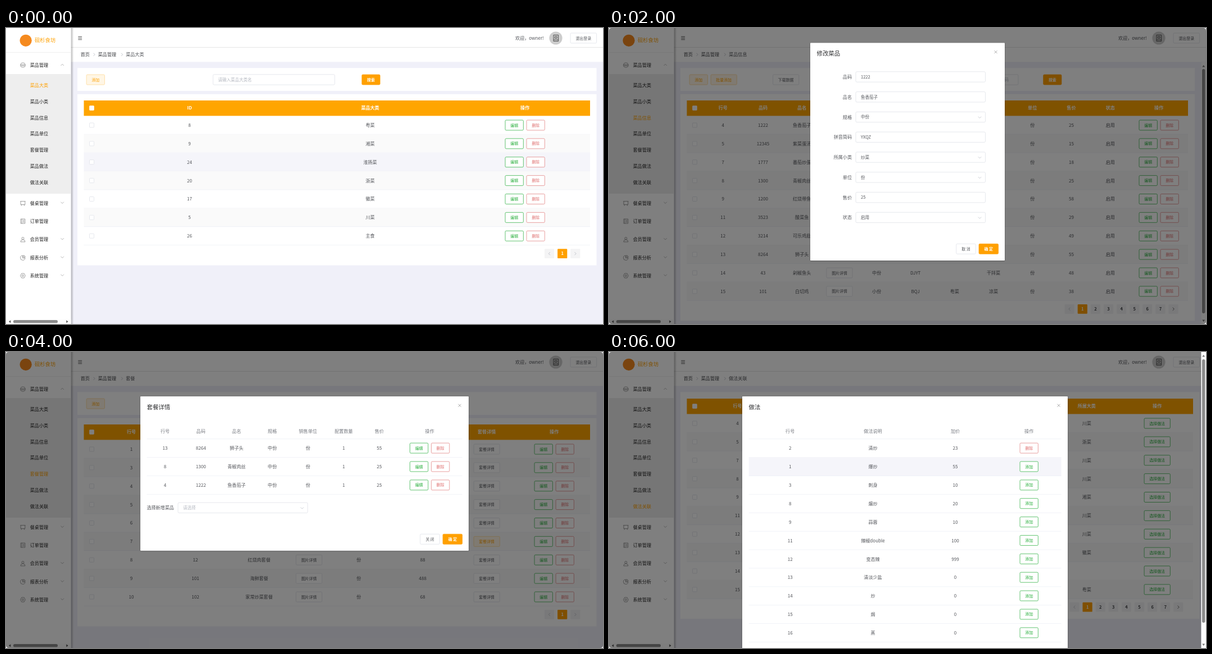
Recreate the animation shown at these times as an HTML page. Size 1062 by 527 pixels, loop 7000 ms.

```html
<!DOCTYPE html>
<html lang="zh-CN">
<head>
<meta charset="utf-8">
<style>
  html, body { margin: 0; width: 100%; height: 100%; overflow: hidden; background: #fff; }
  svg { display: block; width: 100%; height: 100%; }
  text { font-family: "Noto Sans CJK SC", "Noto Sans CJK", "Noto Sans", sans-serif; }
</style>
</head>
<body>
<svg id="stage" viewBox="0 0 1062 527"></svg>
<script>
const ORANGE = '#ffa000', TEXT = '#55575c', BORDER = '#dcdfe6', MUTED = '#b4b8c0';
const ROW = 32.87, CELL = 8.08, SMALL = 6.93;

// Drawing helpers return SVG markup.
const rect = (x, y, w, h, fill, stroke = 'none', r = 0) =>
  `<rect x="${x}" y="${y}" width="${w}" height="${h}" rx="${r}" fill="${fill}" stroke="${stroke}" stroke-width=".7"/>`;
const text = (s, x, y, { size = CELL, fill = TEXT, anchor = 'middle', weight = 400 } = {}) =>
  `<text x="${x}" y="${y + size * .37}" font-size="${size}" fill="${fill}" text-anchor="${anchor}" font-weight="${weight}" xml:space="preserve">${s}</text>`;
const left = (s, x, y, style = {}) => text(s, x, y, { anchor: 'start', ...style });
const path = (d, stroke = '#777', width = .7, fill = 'none') =>
  `<path d="${d}" fill="${fill}" stroke="${stroke}" stroke-width="${width}"/>`;
const hline = (x0, x1, y, color = '#ebeef5') => path(`M${x0} ${y}H${x1}`, color);
const down = (x, y, color = '#aaa') => path(`M${x - 2.7} ${y - 1.3}l2.7 2.7 2.7 -2.7`, color);
const side = (x, y, dir, color) => path(`M${x - dir * 1.3} ${y - 2.6}l${dir * 2.6} 2.6 ${-dir * 2.6} 2.6`, color, .8);
const cross = (x, y) => path(`M${x - 2.5} ${y - 2.5}l5 5m0 -5l-5 5`, '#888');

const BUTTONS = {
  plain: ['#fff', BORDER, TEXT, 400],
  soft: ['#fff6e5', '#ffd48a', ORANGE, 400],
  solid: [ORANGE, ORANGE, '#fff', 600],
  green: ['#fff', '#20ab35', '#20ab35', 500],
  red: ['#fff', '#de7676', '#de6c6c', 400],
};
function button(label, x, y, kind = 'plain', w = label.length > 2 ? 46.2 : 32.3) {
  const [fill, stroke, color, weight] = BUTTONS[kind];
  return rect(x - w / 2, y - 9, w, 18, fill, stroke, 1.7) +
    text(label, x, y, { size: SMALL, fill: color, weight });
}
const editDelete = (x, y) => button('编辑', x - 19, y, 'green') + button('删除', x + 19, y, 'red');

function field(x0, x1, y, value, { select = false, hint = false } = {}) {
  return rect(x0, y - 9.2, x1 - x0, 18.4, '#fff', BORDER, 2) +
    left(value, x0 + 9, y, { size: 7.5, fill: hint ? MUTED : TEXT }) +
    (select ? down(x1 - 10, y + .5, '#b4b8c0') : '');
}
const hintField = (x0, x1, label, select) => field(x0, x1, 92, label, { select, hint: true });

// A cell starting with # is drawn as a button, with ! as a highlighted one.
function cell(value, x, y) {
  if (value[0] === '#') return button(value.slice(1), x, y);
  if (value[0] === '!') return button(value.slice(1), x, y, 'soft');
  return text(value, x, y);
}
const parse = rows => rows.split('|').map(row => row.split(','));

function table({ x0 = 138.5, x1 = 1039, y = 129, heads, xs, rows, opX, hover = -1, hoverFill = '#f5f5fa', op = editDelete }) {
  const box = (cy, stroke) => rect(x0 + 10, cy - 4, 8, 8, '#fff', stroke, 1);
  const headStyle = { fill: '#fff', weight: 700 };
  let out = rect(x0, y, x1 - x0, 27.4, '#ffa500') + box(y + 13.5, '#fff');
  heads.split(',').forEach((h, i) => out += text(h, xs[i], y + 13.5, headStyle));
  out += text('操作', opX, y + 13.5, headStyle);
  parse(rows).forEach((row, i) => {
    const top = y + 27.4 + i * ROW, cy = top + 16.6;
    if (i === hover || i % 2) out += rect(x0, top, x1 - x0, ROW, i === hover ? hoverFill : '#fafafa');
    out += hline(x0, x1, top + ROW) + box(cy, BORDER) + op(opX, cy);
    row.forEach((value, k) => out += cell(value, xs[k], cy));
  });
  return out;
}

function pager(pages, y, right = 1012.8) {
  let out = '';
  for (let i = 0; i <= pages + 1; i++) {
    const x = right - (pages + 1 - i) * 23.1, active = i === 1;
    out += rect(x - 8.6, y - 8.4, 17.2, 16.8, active ? ORANGE : '#f4f4f5', 'none', 1.2);
    if (i === 0) out += side(x, y, -1, MUTED);
    else if (i > pages) out += side(x, y, 1, pages > 1 ? '#444' : MUTED);
    else out += text(i, x, y, { size: 7.5, weight: 700, fill: active ? '#fff' : '#404246' });
  }
  return out;
}

const card = (y0, y1, x0 = 127, x1 = 1050.5) => rect(x0, y0, x1 - x0, y1 - y0, '#fff');
const cards = (bottom, x0, x1) => card(71.2, 112, x0, x1) + card(117.8, bottom, x0, x1);
const add = button('添加', 159.3, 92, 'soft');
const search = x => button('搜索', x, 92, 'solid');

function scrollbar(top, bottom, thumbTop, thumbBottom) {
  return rect(1053.6, top, 8.4, bottom - top, '#fcfcfc') +
    rect(1055, thumbTop, 5.4, thumbBottom - thumbTop, '#8b8b8b', 'none', 2.7) +
    path(`M1055.2 ${top + 8.5}h5l-2.5 -3.4zM1055.2 ${bottom - 7.5}h5l-2.5 3.4z`, 'none', 0, '#777');
}

const MENU = ['菜品大类', '菜品小类', '菜品信息', '菜品单位', '套餐管理', '菜品做法', '做法关联'];
const SECTIONS = [['菜品管理', 66], ['餐桌管理', 312], ['订单管理', 344], ['会员管理', 376.5], ['报表分析', 409], ['系统管理', 441]];
const ICONS = [
  'M-4.5 -.5h9q0 4 -3 4.5h-3q-3 -.5 -3 -4.5zM-4 -1q0 -3 4 -3t4 3M-3.5 1.3h7',
  'M-4.5 -3.5h9M-3.8 -3.5v6h7.6v-6M-2 2.5l-1 2M2 2.5l1 2',
  'M-3.8 -4h7.6v8h-7.6zM-1.8 -4v8M0 -1.8h2.5M0 0h2.5M0 1.8h2.5',
  'M-2 -2a2 2 0 1 0 4 0a2 2 0 1 0 -4 0M-4 4.3q0 -4 4 -4t4 4z',
  'M-.5 -4a4.2 4.2 0 1 0 4.5 4.5h-4.5zM1 -4.3a4 4 0 0 1 3.3 3.3h-3.3z',
  'M-2.2 -4h4.4l2.2 4l-2.2 4h-4.4l-2.2 -4zM-1.6 0a1.6 1.6 0 1 0 3.2 0a1.6 1.6 0 1 0 -3.2 0',
];

function sidebar(active) {
  let out = rect(115.5, 0, 5, 527, 'url(#shade)') + rect(0, 0, 115.5, 527, '#fff') +
    '<circle cx="35.2" cy="22.3" r="10.6" fill="#f58a1f"/>' +
    left('砚杉食坊', 51, 22, { size: 9.3, fill: ORANGE }) + hline(0, 115.5, 43.5, '#e8e8e8') +
    rect(0, 82, 115.5, 213, '#eeeeee');
  SECTIONS.forEach(([label, y], i) => {
    out += left(label, 42.8, y, { fill: '#222', weight: 500 }) +
      `<g transform="translate(30 ${y})">${path(ICONS[i])}</g>`;
    if (i === 0) out += path(`M97.5 ${y + 1}l2.7 -2.7 2.7 2.7`, '#999');
    else if (i !== 2) out += down(100.2, y - 1, '#999');
  });
  MENU.forEach((label, i) => out += left(label, 42.8, 102 + i * 28.83, { fill: i === active ? ORANGE : '#222' }));
  return out + rect(0, 518.5, 115.5, 8.5, '#fcfcfc') + rect(13, 520, 79, 5.3, '#8b8b8b', 'none', 2.6) +
    path('M8.3 520.2v5l-3.3 -2.5zM107.3 520.2v5l3.3 -2.5z', 'none', 0, '#555');
}

function page(active, body, crumb = MENU[active]) {
  return rect(0, 0, 1062, 527, '#f0f0f9') + rect(115, 0, 947, 60.3, '#fff') + hline(115, 1062, 34.5, '#dcdcdc') +
    path('M128.3 15.3h6.8m-6.8 2.7h6.8m-6.8 2.7h6.8', '#444', .9) +
    left('欢迎，owner!', 906, 18) + '<circle cx="978" cy="18" r="11.6" fill="#cdcdcd"/>' +
    path('M974 12.5h8.5v11h-8.5zM974 21h8.5M976.5 15h3.5v3.3h-3.5z', '#444', .9) +
    button('退出登录', 1027.3, 18, 'plain', 46.5) +
    left('首页', 132.8, 47.5, { fill: '#404246' }) + left('菜品管理', 163.8, 47.5, { fill: '#404246' }) +
    left(crumb, 213.2, 47.5) + side(156.8, 47.3, 1, MUTED) + side(206.3, 47.3, 1, MUTED) +
    body + sidebar(active);
}

const dim = (width = 1062) => rect(0, 0, width, 527, 'rgba(0,0,0,.5)');
function dialog(x0, x1, y0, y1, title, body) {
  return `<g filter="url(#drop)">${rect(x0, y0, x1 - x0, y1 - y0, '#fff', 'none', 1)}</g>` +
    left(title, x0 + 11.5, y0 + 19, { size: 10.4, fill: '#303133' }) + cross(x1 - 16, y0 + 16.2) + body;
}
const footer = (cancel, right, y) =>
  button(cancel, right - 57.7, y, 'plain', 34.6) + button('确 定', right - 17.4, y, 'solid', 34.6);

// Form rows are "label,value"; a value starting with > is a drop-down.
function form(y0, rows) {
  return parse(rows).map(([label, value], i) => {
    const y = y0 + i * 35.77, select = value[0] === '>';
    return text(label, 432, y, { anchor: 'end' }) +
      field(439, 669.5, y, select ? value.slice(1) : value, { select });
  }).join('');
}

function dialogTable({ x0, x1, heads, xs, rows, op, hover = -1 }) {
  let out = hline(x0, x1, 154.7);
  heads.split(',').forEach((h, i) => out += text(h, xs[i], 141.3, { fill: '#777a80' }));
  parse(rows).forEach((row, i) => {
    const y = 171.4 + i * ROW;
    if (i === hover) out += rect(x0, y - 16.5, x1 - x0, ROW, '#f5f5fa');
    out += hline(x0, x1, y + 16.3) + op(xs.at(-1), y - .3, i);
    row.forEach((value, k) => out += text(value, xs[k], y));
  });
  return out;
}

function methodTabs() {
  const labels = '全部,焗,炒,口味要求,民俗要求,海鲜做法,蔬菜做法,豆腐做法'.split(',');
  return path('M190.5 71.2V301', '#e2e4ec', 1) + path('M190.5 71.2V94.7', ORANGE, 1.3) +
    labels.map((label, i) => rect(127, 71.3 + i * 28.8, 56, 23.4, '#fff') +
      text(label, 154.8, 83 + i * 28.8, { weight: 700, fill: i ? '#303133' : ORANGE })).join('');
}

const scenes = [
  page(0, cards(422.5) + add + hintField(368.3, 584.8, '请输入菜品大类名') + search(649.2) +
    table({ heads: 'ID,菜品大类', xs: [326.5, 647.8], opX: 923.2, hover: 2,
      rows: '8,粤菜|9,湘菜|24,淮扬菜|20,浙菜|17,徽菜|5,川菜|26,主食' }) + pager(1, 401.7)),

  page(1, cards(521.3, 127, 1042) + add + hintField(700, 802.5, '请输入菜品颜色') +
    hintField(812, 914, '请输入上菜顺序') + search(955.8) +
    table({ x1: 1030, heads: 'ID,编码,菜品小类,所属大类,菜品颜色,上菜顺序',
      xs: [220.2, 326.8, 431.5, 536.7, 641.5, 746.7], opX: 914.5,
      rows: '15,124,,,,2|5,01091,,,,5|12,345623,,,,1|9,1993,,,,1|11,5324,,,,3|4,100111,,,,2|' +
        '1,1199,海鲜,湘菜,颜色3,5|6,1205,炒菜,川菜,颜色2,5|7,1222,炖菜,徽菜,颜色3,4|14,102,米饭,主食,颜色2,5' }) +
    pager(2, 500.3, 1004) + scrollbar(61, 527, 73, 508)) + dim() +
    dialog(358, 704, 79, 359.3, '修改菜品小类',
      form(139.5, '编号,124|菜品小类,12|所属大类,>主食|菜品颜色,>颜色1|上菜顺序,>2') + footer('取 消', 692.7, 338.5)),

  page(2, cards(521.3, 127, 1042) + add + button('批量添加', 204.2, 92, 'soft') + button('下载数据', 314.7, 92) +
    hintField(626, 728, '') + text('请输入品码', 711, 92, { size: 7.5, fill: MUTED, anchor: 'end' }) + search(788.8) +
    table({ x1: 1030, heads: '行号,品码,品名,图片,规格,拼音简码,所属大类,所属小类,单位,售价,状态',
      xs: [202.8, 274, 343.2, 410, 476.2, 545.2, 614.8, 684, 753.2, 822.4, 891.8], opX: 978.2,
      rows: '4,1222,鱼香茄子,,,,,,份,25,启用|5,12345,紫菜蛋汤,,,,,,份,15,启用|7,1777,番茄炒蛋,,,,,,份,18,启用|' +
        '8,1300,青椒肉丝,,,,,,份,25,启用|9,1200,红烧带鱼,,,,,,份,58,启用|11,3523,酸菜鱼,,,,,,份,29,启用|' +
        '12,3214,可乐鸡翅,,,,,,份,49,启用|13,8264,狮子头,,,,,,份,55,启用|' +
        '14,43,剁椒鱼头,#图片详情,中份,DJYT,,干拌菜,份,48,启用|15,101,白切鸡,#图片详情,小份,BQJ,粤菜,凉菜,份,38,启用' }) +
    pager(7, 500.3, 1004) + scrollbar(61, 527, 73, 508)) + dim() +
    dialog(358, 704, 26.5, 414, '修改菜品',
      form(87, '品码,1222|品名,鱼香茄子|规格,>中份|拼音简码,YXQZ|所属小类,>炒菜|单位,>份|售价,25|状态,>启用') +
      footer('取 消', 692.7, 393.3)),

  page(3, cards(488.4) + add + hintField(368.3, 509.7, '请输入菜品单位名称') +
    hintField(527, 651, '请选择销售类型', true) + hintField(668.5, 810, '请输入点菜默认量') + search(870.3) +
    table({ heads: 'ID,菜品单位,销售类型,点菜默认量', xs: [246.4, 407, 567.4, 727.8], opX: 923.2, hover: 2, hoverFill: '#fafafa',
      rows: '1,份,整数,1|2,瓶,小数,1|3,斤,小数,1|4,包,整数,1|5,两,小数,1|6,只,整数,1|7,勺,整数,1|8,头,整数,1|9,扎,整数,1' }) +
    pager(1, 467.4)),

  page(4, cards(488.4) + add +
    table({ heads: '行号,品码,品名,图片,单位,售价,套餐详情', xs: [223, 337, 450.3, 539, 627.6, 741.3, 855.2], opX: 975.2,
      rows: [1, 3, 4, 5, 6, 7].map(n => `${n},,,,,,${n === 7 ? '!' : '#'}套餐详情`).join('|') +
        '|8,12,红烧肉套餐,#图片详情,份,88,#套餐详情|9,101,海鲜套餐,#图片详情,份,488,#套餐详情|10,102,家常炒菜套餐,#图片详情,份,68,#套餐详情' }) +
    pager(1, 467.4), '套餐') + dim() +
    dialog(239, 823, 79, 353.8, '套餐详情',
      dialogTable({ x0: 250.5, x1: 811.7, heads: '行号,品码,品名,规格,销售单位,配置数量,售价,操作',
        xs: [283, 346.7, 410.2, 473.7, 537.2, 600.7, 664, 753.7], op: editDelete,
        rows: '13,8264,狮子头,中份,份,1,55|8,1300,青椒肉丝,中份,份,1,25|4,1222,鱼香茄子,中份,份,1,25' }) +
      left('选择新增菜品', 250.4, 277) + field(306, 536.7, 277.3, '请选择', { select: true, hint: true }) +
      footer('关 闭', 811.8, 333.2)),

  page(5, methodTabs() + cards(521.3, 237.8) + button('添加', 270, 92, 'soft') +
    table({ x0: 249.3, x1: 913, heads: '行号,编码,做法说明,加价,类型,拼音', xs: [319.5, 404.3, 489, 574, 658.8, 743.7], opX: 849.5,
      hover: 4, hoverFill: '#fafafa',
      rows: '1,10101,爆炒,55,豆腐做法,BC|2,10102,清炒,23,蔬菜做法,QC|3,10103,刺身,10,海鲜做法,CS|8,7,煸炒,20,蔬菜做法,BC|' +
        '9,1,蒜蓉,10,海鲜做法,SR|11,9876,辣椒double,100,民俗要求,LJ|12,432,变态辣,999,民俗要求,BTL|' +
        '13,121,清淡少盐,0,口味要求,QTSY|14,8725,炒,0,炒,C|15,32266,焗,0,焗,J' }) +
    pager(2, 500.3)),

  page(6, card(71.2, 475) +
    table({ y: 83, heads: '行号,所属大类', xs: [228.5, 849.8], opX: 975.2, op: (x, y) => button('选择做法', x, y, 'green'),
      rows: '4,川菜|5,浙菜|7,川菜|8,川菜|9,湘菜|11,川菜|12,川菜|13,徽菜|14,|15,粤菜' }) + pager(7, 454.2)) + dim(1053.6) +
    dialog(237, 816, 79, 560, '做法',
      dialogTable({ x0: 248.7, x1: 804.5, heads: '行号,做法说明,加价,操作', xs: [322.2, 469.5, 616, 747.2], hover: 1,
        op: (x, y, i) => i ? button('添加', x, y, 'green') : button('删除', x, y, 'red'),
        rows: '2,清炒,23|1,爆炒,55|3,刺身,10|8,煸炒,20|9,蒜蓉,10|11,辣椒double,100|12,变态辣,999|13,清淡少盐,0|14,炒,0|15,焗,0|16,蒸,0' })) +
    scrollbar(0, 527, 13, 482),
];

const stage = document.getElementById('stage');
stage.innerHTML = `<defs>
  <linearGradient id="shade"><stop stop-color="#000" stop-opacity=".28"/><stop offset="1" stop-color="#000" stop-opacity="0"/></linearGradient>
  <filter id="drop"><feDropShadow dx="0" dy=".6" stdDeviation=".9" flood-opacity=".3"/></filter>
  <clipPath id="frame"><rect width="1062" height="527" rx="4.5"/></clipPath>
</defs><g clip-path="url(#frame)">${scenes.map(s => `<g class="scene" display="none">${s}</g>`).join('')}</g>`;

const groups = [...stage.querySelectorAll('.scene')];
function draw() {
  const current = Math.floor(performance.now() / 1000) % groups.length;
  groups.forEach((g, i) => g.setAttribute('display', i === current ? 'inline' : 'none'));
  requestAnimationFrame(draw);
}
draw();
</script>
</body>
</html>
```
